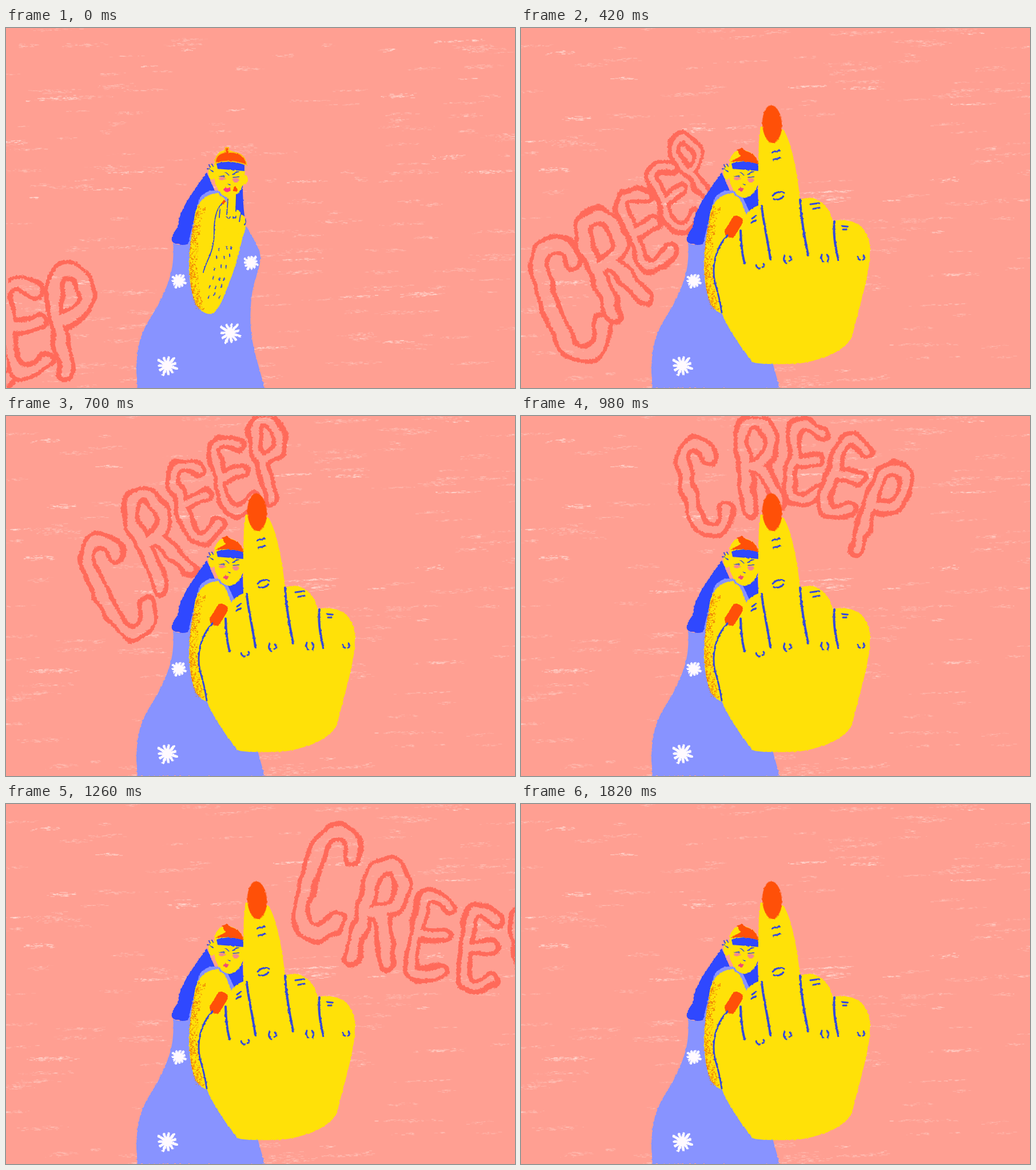
An HTML page with a canvas that plays this animation: 890 px wide and 629 px high, repeating every 1.96 s.

```html
<!DOCTYPE html>
<html lang="en">
<head>
<meta charset="utf-8">
<title>Creep</title>
<style>
html, body { margin: 0; width: 100%; height: 100%; overflow: hidden; background: #ff9f92; }
canvas, svg { position: absolute; left: 0; top: 0; }
#word { filter: url(#wobble); }
.line { fill: none; stroke: #3349dc; stroke-linecap: round; }
</style>
</head>
<body>
<canvas id="paper" width="890" height="629"></canvas>
<canvas id="word" width="890" height="629"></canvas>
<svg width="890" height="629" viewBox="0 0 890 629">
  <defs>
    <filter id="rough" x="0" y="0" width="890" height="629" filterUnits="userSpaceOnUse" color-interpolation-filters="sRGB">
      <feTurbulence type="fractalNoise" baseFrequency=".22" numOctaves="2" seed="4"/>
      <feDisplacementMap in="SourceGraphic" scale="3" xChannelSelector="R" yChannelSelector="G"/>
    </filter>
    <filter id="wobble" x="0" y="0" width="890" height="629" filterUnits="userSpaceOnUse" color-interpolation-filters="sRGB">
      <feTurbulence type="fractalNoise" baseFrequency=".035" seed="7" result="wave"/>
      <feDisplacementMap in="SourceGraphic" in2="wave" scale="16" xChannelSelector="R" yChannelSelector="G" result="bent"/>
      <feTurbulence type="fractalNoise" baseFrequency=".3" seed="2" result="grain"/>
      <feDisplacementMap in="bent" in2="grain" scale="5" xChannelSelector="R" yChannelSelector="G"/>
    </filter>
  </defs>
  <g filter="url(#rough)">
    <!-- hair and dress -->
    <path fill="#2f48ff" d="M351 252C332 280 304 312 300 348C286 367 286 377 302 377Q312 383 324 374L350 320L392 290L414 274Q414 305 417 328L400 330L372 300Z"/>
    <path fill="#8893ff" d="M292 376C295 420 286 445 264 488C240 525 228 545 228 600L230 632H453C440 580 424 545 428 490C430 440 443 430 445 402C445 385 430 365 422 349L398 318L385 290Q355 275 338 298L318 378Q305 381 292 376Z"/>
    <g id="stars" stroke="#fffaff" stroke-width="4.5" stroke-linecap="round"></g>

    <!-- head -->
    <g fill="#ffe108">
      <ellipse cx="360" cy="252" rx="6" ry="13"/>
      <path d="M364 250C362 225 372 213 386 213Q412 216 417 242C420 270 410 293 391 297Q370 294 364 262Z"/>
    </g>
    <path class="line" stroke-width="2" d="M355 239l2 4M352 246l5 1M360 238l2 4M359 249l3 2"/>
    <path fill="#2f48ff" d="M368 237Q390 229 417 238L417 250Q392 248 370 246Z"/>
    <g fill="#f58a8e">
      <ellipse cx="378" cy="263" rx="6" ry="3"/><ellipse cx="402" cy="266" rx="6" ry="4"/>
    </g>
    <path class="line" stroke-width="1.5" d="M373 259l9 0M397 261l10 -1M384 252l6 5M396 256l10 -5M388 273l4 1"/>
    <g id="calm">
      <ellipse cx="418" cy="265" rx="5" ry="8" fill="#ffe108"/>
      <path fill="#ff5008" stroke="#ffbd10" stroke-width="2" d="M366 236C366 222 376 218 384 217L383 209L389 209L390 217Q418 216 421 240Q395 228 366 236Z"/>
      <path fill="#ff3586" d="M380 282l4-4 3 2 4-2 2 5q-7 8-13-1z"/>
    </g>
    <g id="cross">
      <path fill="#ff5008" d="M366 234L384 224L377 213L386 209L393 215Q412 220 415 238Q392 230 366 234Z"/>
      <path fill="#f04a78" d="M379 282l5-4 6 3-4 5z"/>
    </g>

    <!-- arm -->
    <path fill="#ffe108" d="M370 288C346 291 332 305 329 335C321 380 316 420 325 460C330 487 345 503 362 499C376 488 382 465 396 430C406 400 412 370 420 346L395 328L384 300Z"/>
    <g id="freckles" fill="#ee7a08"></g>
    <g id="small">
      <path fill="#ffe108" d="M364 345Q362 318 378 307Q387 312 386 300L392 284Q399 276 403 287L402 318Q409 316 410 326Q419 326 420 344L412 362Z"/>
      <path fill="#ff5008" d="M398 285q-1-8 3-9 5 4 3 10z M376 307l5-7 4 3-4 5z"/>
      <path class="line" stroke-width="1.8" d="M378 307C368 315 363 335 364 360C363 395 350 405 345 427M388 300L386 326M403 291L402 320M374 317L373 331M410 327L408 338M386 330q4 5 6 0M397 330q4 4 5-1M417 344q3-4 2-9"/>
      <g id="hairs" class="line" stroke-width="2"></g>
    </g>

    <!-- raised hand -->
    <g id="hand">
      <path fill="#ffe108" d="M419 172C414 200 415 250 415 310C400 315 392 326 386 338L360 362C340 385 334 420 340 455C344 480 350 500 366 528Q384 558 405 584C420 589 480 588 500 584C540 575 572 560 580 535C588 500 604 450 609 410C612 385 612 360 590 343Q568 332 545 337C540 310 515 288 488 300C484 260 474 200 459 178Z"/>
      <ellipse cx="439" cy="168" rx="17" ry="33" fill="#ff5008" transform="rotate(-3 439 168)"/>
      <rect x="362" y="327" width="20" height="40" rx="8" fill="#ff5008" transform="rotate(32 372 347)"/>
      <path class="line" stroke-width="4" d="M421 311C424 345 432 370 436 404M384 354Q385 390 391 411M488 300C490 340 497 370 502 397M548 338Q545 365 555 405"/>
      <path class="line" stroke-width="3" d="M361 362C340 385 333 415 339 445Q347 470 351 497"/>
      <path class="line" stroke-width="3" d="M440 217l12-3M441 230l12-3M440 293q10-10 20-5M442 299q10 3 17-5M506 308l15-2M511 316l11-2M404 333l7-5M403 340l7-4M561 346l10 1M563 352l6 0M411 414q2 7 7 6M424 412q3 4-2 6M461 398q-4 8 3 13M470 399q6 5 0 8M526 396q-3 9 3 13M535 396q4 6 1 12M589 400q1 5 4 5M599 397q3 5-1 8"/>
    </g>
  </g>
</svg>
<script>
const $ = id => document.getElementById(id);
const STEP = 140, COUNT = 14, SVG = 'http://www.w3.org/2000/svg';

function random(seed) {
  return () => (seed = (seed * 16807) % 2147483647) / 2147483647;
}
function add(parent, tag, attrs) {
  const el = parent.appendChild(document.createElementNS(SVG, tag));
  for (const k in attrs) el.setAttribute(k, attrs[k]);
}

for (const [x, y, r] of [[302, 442, 11], [428, 410, 11], [392, 533, 17], [282, 590, 16]])
  for (let k = 0; k < 11; k++) {
    const a = k * Math.PI * 2 / 11 + .3, d = r * (k % 3 ? .9 : 1.1);
    add($('stars'), 'path', { d: `M${x} ${y}l${d * Math.cos(a)} ${d * Math.sin(a)}` });
  }

const dot = random(31);
for (let k = 0; k < 420; k++) {
  const y = 312 + dot() * 180, edge = 321 + 12 * ((y - 408) / 85) ** 2;
  add($('freckles'), 'circle', { cx: edge + dot() ** 1.6 * 14, cy: y, r: .5 + dot() * .6 });
}
for (let k = 0; k < 18; k++) {
  const row = Math.floor(k / 3), x = 372 + k % 3 * 10 - row * 4 + dot() * 4;
  add($('hairs'), 'path', { d: `M${x} ${378 + row * 17 + dot() * 8}l${1 - row * .6} 4` });
}

// Chalk paper: many faint smudges and a few strong ones
function makePaper(seed) {
  const c = document.createElement('canvas'), g = c.getContext('2d'), rnd = random(seed);
  c.width = 890; c.height = 629;
  g.fillStyle = '#ff9f92';
  g.fillRect(0, 0, 890, 629);
  for (let n = 0; n < 190; n++) {
    const x = rnd() * 890, y = rnd() * 629, w = 15 + rnd() * 40, h = 1.5 + rnd() * 4;
    const alpha = n % 8 ? .3 : .65;
    for (let k = 0; k < w * h / 4; k++) {
      const u = rnd() + rnd() - 1, v = rnd() + rnd() - 1;
      g.fillStyle = `rgba(255,232,226,${alpha * rnd()})`;
      g.fillRect(x + u * w, y + v * h - u * w * .04, 2 + rnd() * 6, .7 + rnd() * .9);
    }
  }
  return c;
}
const papers = [makePaper(1234), makePaper(9876)];

// Letter skeletons in a unit box, one list of points per stroke
const bowl = [[-.4, -.35], [-.15, -.52], [.32, -.48], [.5, -.25], [.3, -.05], [-.2, 0]];
const C = [[[.36, -.3], [.44, -.4], [.05, -.53], [-.42, -.44], [-.46, 0], [-.42, .38], [-.15, .53], [.32, .48], [.5, .3]]];
const R = [[[-.4, .5], [-.36, .2], [-.38, -.05], ...bowl], [[0, 0], [.15, .04], [.3, .25], [.5, .45]]];
const E = [[[.5, -.38], [.05, -.52], [-.42, -.45], [-.36, -.1], [-.42, .1], [-.44, .45], [0, .52], [.5, .38]], [[-.35, 0], [.45, -.04]]];
const P = [[[-.05, .5], [-.12, .25], [-.25, .05], ...bowl]];
const letters = [C, R, E, E, P];

// The word is an arc: step, x and y of its first, middle and last letter, first and last height
const arcs = [
  [0, -170, 700, -42, 559, 108, 512, 190, 176],
  [3, 85, 474, 215, 352, 301, 244, 198, 110],
  [5, 195, 298, 328, 150, 459, 76, 170, 136],
  [7, 320, 125, 496, 80, 624, 163, 152, 152],
  [9, 562, 137, 740, 231, 913, 258, 182, 146],
  [11, 844, 234, 1040, 330, 1220, 480, 216, 146]
];

function arcAt(step) {
  const n = Math.min(arcs.length - 1, Math.max(1, arcs.findIndex(a => a[0] >= step) + arcs.length) % arcs.length || 1);
  const i = step > 11 ? arcs.length - 1 : n, a = arcs[i - 1], b = arcs[i];
  const t = (step - a[0]) / (b[0] - a[0]);
  return a.map((v, k) => v + (b[k] - v) * t);
}

// Parabola through a, b, c at t = 0, .5, 1, and its slope
const along = (a, b, c, t) => a * (1 - t) * (1 - 2 * t) + b * 4 * t * (1 - t) + c * t * (2 * t - 1);
const slope = (a, b, c, t) => a * (4 * t - 3) + b * (4 - 8 * t) + c * (4 * t - 1);

function drawLetter(g, strokes, x, y, turn, h) {
  const w = h * .4, thick = h * .14 + 1, cos = Math.cos(turn), sin = Math.sin(turn), path = new Path2D();
  for (const s of strokes) {
    const p = s.map(([u, v]) => [x + u * w * cos - v * h * sin, y + u * w * sin + v * h * cos]);
    path.moveTo(...p[0]);
    for (let k = 1; k < p.length - 1; k++) {
      const end = k === p.length - 2 ? p[k + 1] : [(p[k][0] + p[k + 1][0]) / 2, (p[k][1] + p[k + 1][1]) / 2];
      path.quadraticCurveTo(...p[k], ...end);
    }
    if (p.length === 2) path.lineTo(...p[1]);
  }
  g.lineCap = g.lineJoin = 'round';
  g.strokeStyle = '#ff6a5a';
  g.lineWidth = thick + 8;
  g.stroke(path);
  g.globalCompositeOperation = 'destination-out';
  g.lineWidth = thick - 8;
  g.stroke(path);
  g.globalCompositeOperation = 'source-over';
}

function drawWord(g, step) {
  const [, ax, ay, bx, by, cx, cy, first, last] = arcAt(step);
  g.clearRect(0, 0, 890, 629);
  letters.forEach((glyph, k) => {
    const t = k / 4, turn = Math.atan2(slope(ay, by, cy, t), slope(ax, bx, cx, t)) / 2;
    const h = (first + (last - first) * t) * (glyph === E ? .88 : 1);
    drawLetter(g, glyph, along(ax, bx, cx, t), along(ay, by, cy, t), turn, h);
  });
}

const paper = $('paper').getContext('2d'), ink = $('word').getContext('2d');
const show = (id, on) => $(id).style.display = on ? '' : 'none';

function draw(step) {
  paper.drawImage(papers[step % 2], 0, 0);
  drawWord(ink, step);
  show('calm', !step);
  show('small', !step);
  show('cross', step);
  show('hand', step);
  const size = Math.min(1, .25 + .3 * step);
  $('hand').setAttribute('transform', `translate(375 360) scale(${size}) translate(-375 -360)`);
}

let last = -1;
function tick() {
  const step = Math.floor(performance.now() / STEP) % COUNT;
  if (step !== last) draw(last = step);
  requestAnimationFrame(tick);
}
tick();
</script>
</body>
</html>
```
